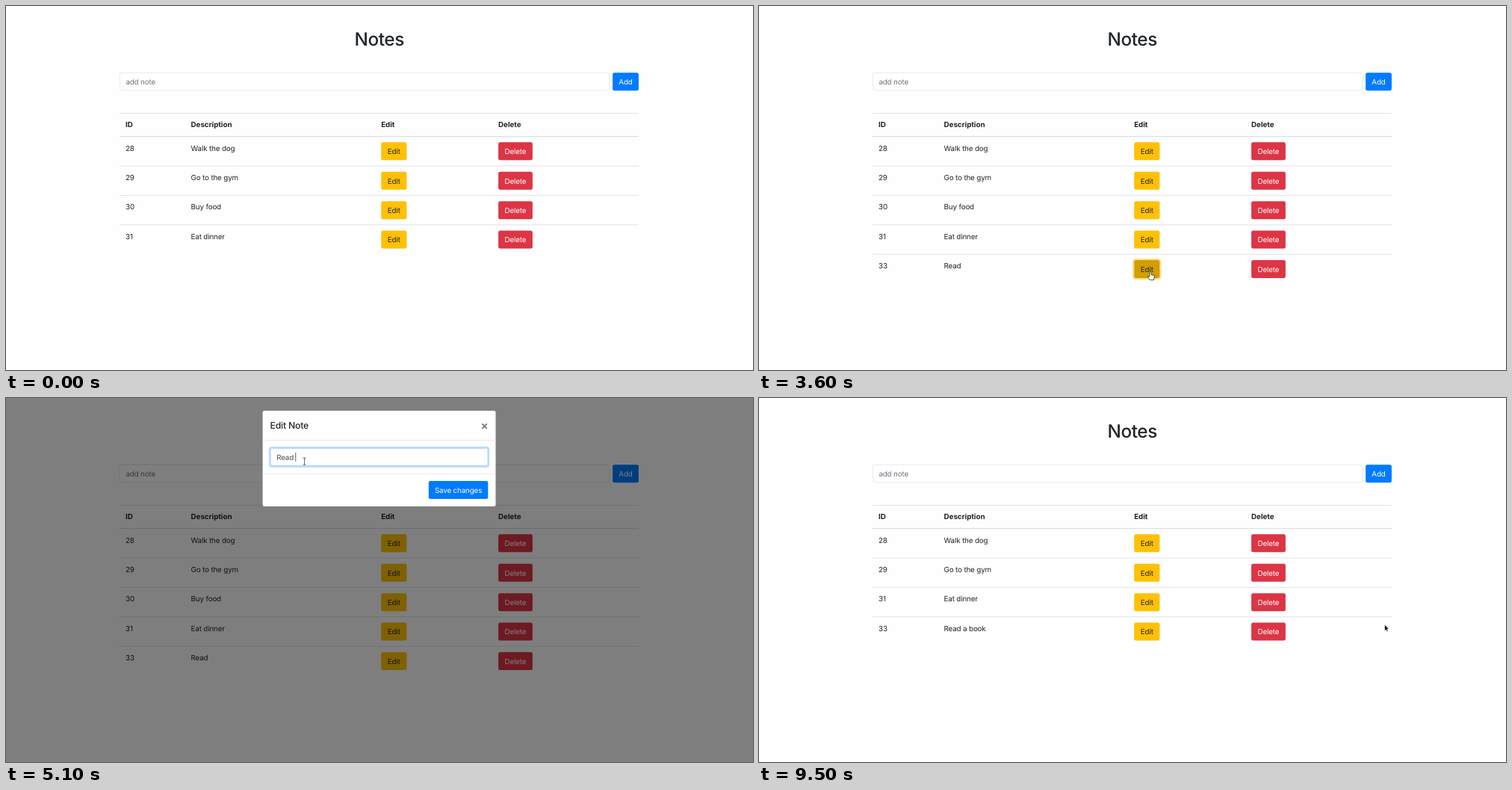
These frames come from a looping animation (1000x487 px, 9.9 s). An HTML page:

```html
<!DOCTYPE html>
<html lang="en">
<head>
<meta charset="utf-8">
<title>Notes</title>
<style>
html, body { margin: 0; width: 100%; height: 100%; overflow: hidden; background: #fefefe; }
svg { display: block; width: 100vw; height: 100vh; }
text { font-family: Inter, sans-serif; letter-spacing: -.015em; white-space: pre; text-rendering: geometricPrecision; }
</style>
</head>
<body>
<svg id="stage" viewBox="0 0 1000 487"></svg>
<script>
const LOOP = 9900, STEP = 100, FONT = 9.8;
const LEFT = 152, WIDTH = 695, ROW_TOP = 174.6, ROW_HEIGHT = 39.44, CONTROL = 24;
const INK = '#212529', RULE = '#e0e4e7';
const BLUE = { base: '#007bff', hover: '#0069d9', active: '#0062cc', ink: '#fff' };
const AMBER = { base: '#ffc107', hover: '#e0a800', active: '#d39e00', ink: INK };
const RED = { base: '#dc3545', hover: '#c82333', active: '#bd2130', ink: '#fff' };

// Moments of the story
const MOUSE_IN = 1900, ADDED = 2600, EDIT_CLICK = 3600, MODAL_IN = 3800, FIELD_CLICK = 4800,
  SAVED = 6700, DELETE_CLICK = 8200, DELETED = 8300;

const moves = [
  { from: 2300, to: 2500, x: 847.4, y: 107 },    // Add
  { from: 2800, to: 3500, x: 524, y: 355 },      // Edit
  { from: 4100, to: 4700, x: 399.5, y: 84.7 },   // text field
  { from: 6300, to: 6500, x: 582.5, y: 122 },    // Save changes
  { from: 7100, to: 7600, x: 670, y: 236 },
  { from: 7600, to: 7700, x: 663, y: 251.5 },
  { from: 7700, to: 7900, x: 678, y: 270 },      // Delete
  { from: DELETED, to: 8600, x: 826, y: 300 },
  { from: 9300, to: 9500, x: 837.5, y: 303 }
];

const cursors = {
  arrow: '<path d="M0 0V8.6L2 6.9 3.3 9.7 4.6 9.1 3.4 6.3H5.8Z" fill="#111" stroke="#fff" stroke-width=".6"/>',
  hand: '<path d="M-1 1Q0-.6 1 1V4.5L5.5 5.8 4.6 11.5H-.8L-4 7 -1 7Z" fill="#fff" stroke="#333" stroke-width=".8" stroke-linejoin="round"/>',
  beam: '<path d="M-2-4.5H2M0-4.5V4.5M-2 4.5H2" stroke="#444" stroke-width=".8"/>'
};

const stage = document.getElementById('stage');
const pen = document.createElement('canvas').getContext('2d');
pen.font = `${FONT}px Inter, sans-serif`;
pen.letterSpacing = `${-.015 * FONT}px`;

const progress = (t, from, to) => Math.max(0, Math.min(1, (t - from) / (to - from)));
const smooth = p => p * p * (3 - 2 * p);
const typed = (s, t, start, pause) => s.slice(0, Math.max(0, Math.floor((t - start) / pause) + 1));
const blinkOn = t => t % 1000 < 500;
const inside = (p, x, y, w, h, pad = 0) =>
  Math.abs(p.x - x - w / 2) <= w / 2 + pad && Math.abs(p.y - y - h / 2) <= h / 2 + pad;

function mouseAt(t) {
  return moves.reduce((p, m) => {
    const k = smooth(progress(t, m.from, m.to));
    return { x: p.x + (m.x - p.x) * k, y: p.y + (m.y - p.y) * k };
  }, { x: 996, y: 190 });
}

const text = (x, y, s, { size = FONT, weight = 400, fill = INK, anchor = 'start', spacing = -.015 } = {}) =>
  `<text x="${x}" y="${y}" font-size="${size}" font-weight="${weight}" fill="${fill}" text-anchor="${anchor}" style="letter-spacing:${spacing}em">${s}</text>`;

const rect = (x, y, w, h, fill, extra = '') =>
  `<rect x="${x}" y="${y}" width="${w}" height="${h}" fill="${fill}" ${extra}/>`;

const ring = (x, y, w, color, alpha) =>
  rect(x - 1, y - 1, w + 2, CONTROL + 2, 'none', `rx="3" stroke="${color}" stroke-opacity="${alpha}" stroke-width="2"`);

function render(t) {
  const tip = mouseAt(t), before = mouseAt(t - STEP);
  const modalOpen = t > MODAL_IN && t < SAVED;
  let cursor = 'arrow';

  function button(x, y, w, label, color, live, pressed = false) {
    if (live && inside(tip, x, y, w, CONTROL, 1)) cursor = 'hand';
    const state = pressed ? 'active' : live && inside(before, x, y, w, CONTROL) ? 'hover' : 'base';
    return (pressed ? ring(x, y, w, color.base, .5) : '')
      + rect(x, y, w, CONTROL, color[state], 'rx="2.5"')
      + text(x + w / 2, y + 15.8, label, { fill: color.ink, anchor: 'middle' });
  }

  function input(x, y, w, value, hint, focus, caret, live) {
    if (live && inside(tip, x, y, w, CONTROL)) cursor = 'beam';
    return (focus ? ring(x, y, w, '#007bff', .25 * focus) : '')
      + rect(x + .3, y + .3, w - .6, CONTROL - .6, '#fff', `rx="2.5" stroke="${focus > .5 ? '#80bdff' : '#dfe3e7'}" stroke-width=".7"`)
      + text(x + 8.4, y + 15.7, value || hint, { fill: value ? '#495057' : '#6c757d' })
      + (caret ? rect(x + 8.2 + pen.measureText(value).width, y + 6, .7, 12, '#222') : '');
  }

  function table() {
    const loading = t === ADDED || t === SAVED;
    const [id, note, edit, del] = loading ? [160, 259.5, 538.5, 672] : [160, 247.6, 502.2, 659.1];
    const heading = (x, s) => text(x, 162.4, s, { weight: 700, spacing: -.005 });
    const rows = [[28, 'Walk the dog'], [29, 'Go to the gym'], [30, 'Buy food'], [31, 'Eat dinner']];
    if (t > ADDED) rows.push([33, t > SAVED ? 'Read a book' : 'Read']);
    if (t >= DELETED) rows.splice(2, 1);
    const body = rows.map(([key, s], i) => {
      const y = ROW_TOP + ROW_HEIGHT * i;
      return (i ? rect(LEFT, y - .6, WIDTH, 1, RULE) : '')
        + text(id, y + 19, key) + text(note, y + 19, s)
        + button(edit, y + 7.7, 34.2, 'Edit', AMBER, !modalOpen, key === 33 && t >= EDIT_CLICK && t <= MODAL_IN)
        + button(del, y + 7.7, 45.8, 'Delete', RED, !modalOpen, key === 30 && t >= DELETE_CLICK);
    });
    return rect(LEFT, 143, WIDTH, 1, RULE) + rect(LEFT, 173.9, WIDTH, 1.25, '#dcdfe3')
      + heading(id, 'ID') + heading(note, 'Description') + heading(edit, 'Edit') + heading(del, 'Delete')
      + (loading ? '' : body.join(''));
  }

  function modal() {
    if (!modalOpen) return '';
    const p = progress(t, MODAL_IN, MODAL_IN + 300), x = 343.6, w = 311.9;
    const value = 'Read' + typed(' a book', t, 5100, STEP);
    const caret = t >= FIELD_CLICK && t < 6200;
    return `<g transform="translate(0 ${-31 * (1 - p) ** 2})" opacity="${Math.min(1, p * 2)}">`
      + rect(x, 17, w, 128, '#fff', 'rx="2.5"')
      + text(x + 10, 41.2, 'Edit Note', { size: 12.2, weight: 500 })
      + text(640.5, 41.5, '×', { size: 15, weight: 700, fill: '#7f7f7f', anchor: 'middle' })
      + rect(x, 56, w, .8, RULE) + rect(x, 100.8, w, .8, RULE)
      + input(x + 10.2, 67, w - 20.4, value, '', progress(t, FIELD_CLICK - 200, FIELD_CLICK), caret, true)
      + button(565.8, 111, 79.5, 'Save changes', BLUE, true) + '</g>';
  }

  const focus = t < ADDED ? progress(t, 200, 500) : 0;
  const caret = focus > 0 && blinkOn(t + 600);
  const shade = t < SAVED ? progress(t, 3667, 3817) / 2 : 0;
  const value = t < ADDED ? typed('Read', t, 800, 200) : '';
  const picture = rect(0, 0, 1000, 487, '#fefefe')
    + text(499.7, 53.4, 'Notes', { size: 24.3, weight: 500, anchor: 'middle' })
    + input(LEFT, 89.2, 656, value, 'add note', focus, caret, !modalOpen)
    + button(812.1, 89.2, 34.8, 'Add', BLUE, !modalOpen)
    + table()
    + rect(0, 0, 1000, 487, '#000', `opacity="${shade}"`)
    + modal();
  return picture + (t >= MOUSE_IN ? `<g transform="translate(${tip.x} ${tip.y})">${cursors[cursor]}</g>` : '');
}

let shown = -1;
function tick() {
  const t = Math.floor(performance.now() % LOOP / STEP) * STEP;
  if (t !== shown) stage.innerHTML = render(shown = t);
  requestAnimationFrame(tick);
}
tick();
</script>
</body>
</html>
```
